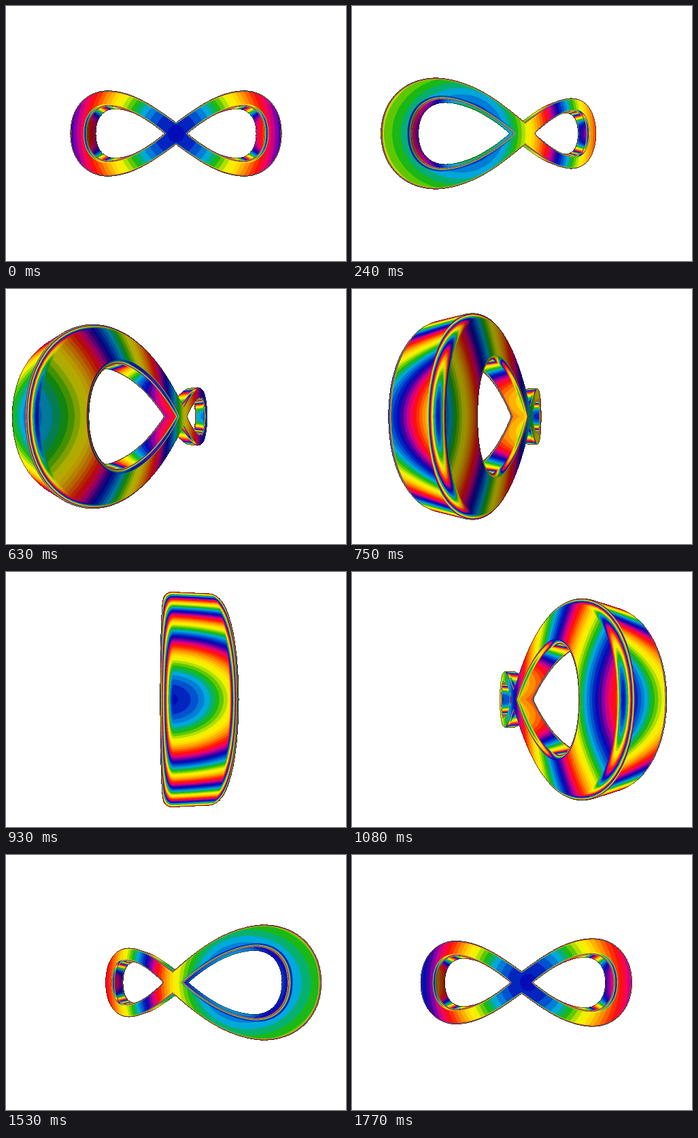
These frames come from a looping animation (500x375 px, 1.8 s). An HTML page with a canvas:

```html
<!DOCTYPE html>
<html lang="en">
<head>
<meta charset="utf-8">
<title>Turning infinity loop</title>
<style>
html, body { margin: 0; width: 100%; height: 100%; overflow: hidden; background: #fff; }
canvas { display: block; width: 500px; height: 375px; }
</style>
</head>
<body>
<canvas id="stage" width="500" height="375"></canvas>
<script>
const W = 500, H = 375, SS = 2, BW = W * SS, BH = H * SS;
const LOOP = 1800, STEP = 30;
const FOCAL = 183.4 * SS, DIST = 195, CX = BW / 2, CY = BH / 2;
const WALL = 8.8, BEVEL_Z = 4.5, BEVEL_IN = 3;
const SEG = 22, ROUND = 5;

const ctx = document.getElementById('stage').getContext('2d');
const image = ctx.createImageData(W, H);
const out = new Uint32Array(image.data.buffer);
const depth = new Float32Array(BW * BH);
const color = new Uint32Array(BW * BH);
const cover = new Uint8Array(W * H);

// Rainbow: position in the cycle, then red, green, blue
const STOPS = [
  [0, 4, 12, 184], [.05, 0, 64, 200], [.1, 0, 110, 215], [.17, 0, 172, 220],
  [.24, 10, 180, 50], [.28, 40, 190, 0], [.35, 170, 220, 0], [.42, 255, 250, 0],
  [.5, 255, 215, 0], [.6, 255, 140, 0], [.72, 255, 20, 0], [.81, 245, 0, 110],
  [.88, 130, 0, 170], [.95, 40, 0, 150], [1, 4, 12, 184]
];
const CYCLES = 4, BANDS = 21;

function rainbow(p) {
  let i = 1;
  while (STOPS[i][0] < p) i++;
  const a = STOPS[i - 1], b = STOPS[i], k = (p - a[0]) / (b[0] - a[0]);
  return [1, 2, 3].map(c => a[c] + (b[c] - a[c]) * k);
}
const palette = Array.from({ length: BANDS }, (_, i) => rainbow(Math.max(0, i - .5) / BANDS));

// One quarter of the outer edge and of the hole, two cubic curves each
const OUTER = [[0, 16.8, 30, 38.5, 64, 63.7, 101, 63.7], [101, 63.7, 130.5, 63.7, 156, 41, 156, 0]];
const INNER = [[17.2, 0, 46, 23.3, 74.5, 40, 101, 40], [101, 40, 116, 40, 132, 29, 132, 0]];

function bezier(c, t) {
  const s = 1 - t;
  const at = i => s*s*s*c[i] + 3*s*s*t*c[i+2] + 3*s*t*t*c[i+4] + t*t*t*c[i+6];
  const slope = i => s*s*(c[i+2]-c[i]) + 2*s*t*(c[i+4]-c[i+2]) + t*t*(c[i+6]-c[i+4]);
  return { x: at(0), y: at(1), dx: slope(0), dy: slope(1) };
}

function contour(curves, side, corner) {
  const list = [];
  curves.forEach((c, n) => {
    for (let i = n ? 1 : 0; i <= SEG; i++) {
      const p = bezier(c, i / SEG), len = Math.hypot(p.dx, p.dy);
      const nx = -side * p.dy / len, ny = side * p.dx / len;
      const dir = list.length ? [nx, ny] : corner;
      list.push({ x: p.x, y: p.y, nx, ny, ix: p.x - dir[0] * BEVEL_IN, iy: p.y - dir[1] * BEVEL_IN });
    }
  });
  return list;
}

// Cross-section of the rim, from back face to front face
const profile = [];
for (const s of [-1, 1]) {
  for (let i = 0; i <= ROUND; i++) {
    const a = (s < 0 ? ROUND - i : i) / ROUND * Math.PI / 2;
    profile.push({ inset: 1 - Math.cos(a), z: s * (WALL + BEVEL_Z * Math.sin(a)), side: Math.cos(a), up: s * Math.sin(a) });
  }
}

const verts = [], tris = [];
function vertex(x, y, z, nx, ny, nz) {
  verts.push({ x, y, z, nx, ny, nz });
  return verts.length - 1;
}
function quad(a, b, c, d) { tris.push([a, b, c], [b, c, d]); }

function addRim(line, mx, my) {
  let last = null;
  for (const p of line) {
    const row = profile.map(q => vertex(
      mx * (p.x + (p.ix - p.x) * q.inset), my * (p.y + (p.iy - p.y) * q.inset), q.z,
      mx * p.nx * q.side, my * p.ny * q.side, q.up));
    if (last) for (let i = 1; i < row.length; i++) quad(last[i - 1], last[i], row[i - 1], row[i]);
    last = row;
  }
}

function addFace(a, b, mx, my, s) {
  const put = (x, y) => vertex(mx * x, my * y, s * (WALL + BEVEL_Z), 0, 0, s);
  const rows = a.map((p, i) => [put(p.ix, p.iy), put(b[i].ix, b[i].iy)]);
  tris.push([put(0, 0), rows[0][0], rows[0][1]]);
  for (let i = 1; i < rows.length; i++) quad(...rows[i - 1], ...rows[i]);
}

const outer = contour(OUTER, 1, [0, 1]);
const inner = contour(INNER, -1, [1, 0]);
for (const mx of [-1, 1]) for (const my of [-1, 1]) {
  addRim(outer, mx, my);
  addRim(inner, mx, my);
  for (const s of [-1, 1]) addFace(outer, inner, mx, my, s);
}

function project(v, c, s) {
  const x = v.x * c + v.z * s, z = v.z * c - v.x * s, w = DIST - z;
  const nx = v.nx * c + v.nz * s, nz = v.nz * c - v.nx * s;
  v.px = CX + FOCAL * x / w;
  v.py = CY + FOCAL * v.y / w;
  v.iw = 1 / w;
  v.qx = nx / w;
  v.qy = v.ny / w;
  v.qz = nz / w;
  v.front = nz * w - nx * x - v.ny * v.y > 0;
}

// The tint follows the angle between the surface and the line of sight
function shade(px, py, nx, ny, nz) {
  const vx = (CX - px) / FOCAL, vy = (CY - py) / FOCAL;
  const len = Math.sqrt(nx * nx + ny * ny + nz * nz);
  const facing = (nx * vx + ny * vy + nz) / (len * Math.sqrt(vx * vx + vy * vy + 1));
  const turn = (1 - Math.min(1, Math.max(0, facing))) * CYCLES;
  const rgb = palette[Math.floor(turn * BANDS + .8) % BANDS];
  const right = Math.max(0, nx / len), m = 1 - .45 * right ** 4;
  return (rgb[2] * m) << 16 | (rgb[1] * m) << 8 | (rgb[0] * m);
}

function fill(a, b, c) {
  const area = (b.px - a.px) * (c.py - a.py) - (b.py - a.py) * (c.px - a.px);
  if (Math.abs(area) < 1e-6) return;
  const x0 = Math.max(0, Math.ceil(Math.min(a.px, b.px, c.px) - .5));
  const x1 = Math.min(BW - 1, Math.floor(Math.max(a.px, b.px, c.px) - .5));
  const y0 = Math.max(0, Math.ceil(Math.min(a.py, b.py, c.py) - .5));
  const y1 = Math.min(BH - 1, Math.floor(Math.max(a.py, b.py, c.py) - .5));
  const EPS = -1e-6;
  for (let y = y0; y <= y1; y++) {
    const py = y + .5;
    for (let x = x0; x <= x1; x++) {
      const px = x + .5;
      const u = ((b.px - px) * (c.py - py) - (b.py - py) * (c.px - px)) / area;
      const v = ((c.px - px) * (a.py - py) - (c.py - py) * (a.px - px)) / area;
      const t = 1 - u - v;
      if (u < EPS || v < EPS || t < EPS) continue;
      const near = u * a.iw + v * b.iw + t * c.iw, i = y * BW + x;
      if (near <= depth[i]) continue;
      depth[i] = near;
      color[i] = shade(px, py,
        u * a.qx + v * b.qx + t * c.qx,
        u * a.qy + v * b.qy + t * c.qy,
        u * a.qz + v * b.qz + t * c.qz);
    }
  }
}

function resolve() {
  for (let y = 0; y < H; y++) for (let x = 0; x < W; x++) {
    let n = 0, r = 0, g = 0, b = 0;
    for (let k = 0; k < SS * SS; k++) {
      const i = (y * SS + (k >> 1)) * BW + x * SS + (k & 1);
      if (!depth[i]) continue;
      n++;
      r += color[i] & 255;
      g += color[i] >> 8 & 255;
      b += color[i] >> 16 & 255;
    }
    const o = y * W + x;
    cover[o] = n >= 2 ? 1 : 0;
    out[o] = n >= 2 ? (255 << 24 | (b / n) << 16 | (g / n) << 8 | (r / n)) : 0xffffffff;
  }
  // Dark hairline along the silhouette
  for (let o = W; o < W * (H - 1); o++) {
    if (!cover[o] || (cover[o - 1] && cover[o + 1] && cover[o - W] && cover[o + W])) continue;
    const p = out[o], m = .5;
    out[o] = 255 << 24 | ((p >> 16 & 255) * m) << 16 | ((p >> 8 & 255) * m) << 8 | ((p & 255) * m);
  }
}

function draw(step) {
  const angle = step * STEP / LOOP * Math.PI;
  const c = Math.cos(angle), s = Math.sin(angle);
  depth.fill(0);
  for (const v of verts) project(v, c, s);
  for (const t of tris) {
    const p = verts[t[0]], q = verts[t[1]], r = verts[t[2]];
    if (p.front || q.front || r.front) fill(p, q, r);
  }
  resolve();
  ctx.putImageData(image, 0, 0);
}

let shown = -1, start = null;
function tick(now) {
  if (start === null) start = now;
  const step = Math.floor(Math.max(0, now - start) % LOOP / STEP);
  if (step !== shown) draw(shown = step);
  requestAnimationFrame(tick);
}
draw(0);
requestAnimationFrame(tick);
</script>
</body>
</html>
```
